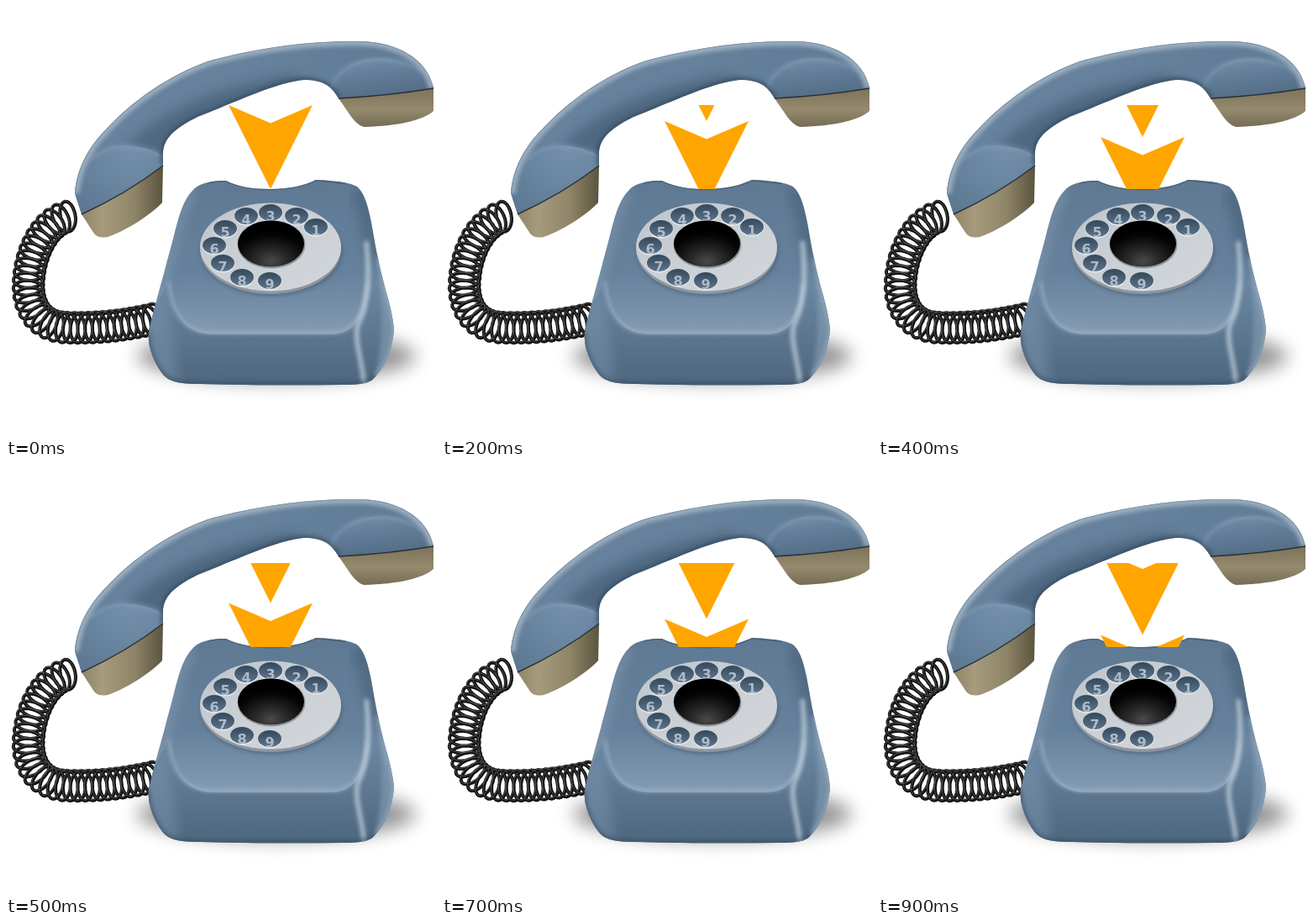
An HTML page for the animation above (1 s loop, 512x512 px).

```html
<!DOCTYPE html>
<html lang="en">
<head>
<meta charset="utf-8">
<title>Telephone</title>
<style>
html, body { margin: 0; width: 100%; height: 100%; overflow: hidden; background: #fff; }
svg { display: block; width: 100vw; height: 100vh; }
text { font: bold 16px "DejaVu Sans", sans-serif; text-anchor: middle; fill: #aebbc7; }
</style>
</head>
<body>
<svg viewBox="0 0 512 512">
  <defs>
    <linearGradient id="bar" gradientUnits="userSpaceOnUse" x1="90" y1="0" x2="509" y2="0">
      <stop offset="0" stop-color="#67829d"/><stop offset=".5" stop-color="#66819c"/>
      <stop offset="1" stop-color="#5f7a95"/>
    </linearGradient>
    <radialGradient id="capL" gradientUnits="userSpaceOnUse" cx="150" cy="168" r="100">
      <stop offset="0" stop-color="#7590ab"/><stop offset=".5" stop-color="#68849f"/>
      <stop offset="1" stop-color="#5b7690"/>
    </radialGradient>
    <linearGradient id="capR" x1="0" y1="0" x2=".3" y2="1">
      <stop offset="0" stop-color="#7891aa"/><stop offset=".45" stop-color="#627d98"/>
      <stop offset="1" stop-color="#516a83"/>
    </linearGradient>
    <linearGradient id="tanL" x1="0" y1="0" x2="1" y2="0">
      <stop offset="0" stop-color="#8f8566"/><stop offset=".25" stop-color="#a69b7d"/>
      <stop offset=".65" stop-color="#8e8467"/><stop offset="1" stop-color="#5b543f"/>
    </linearGradient>
    <linearGradient id="tanR" x1="0" y1="0" x2="0" y2="1">
      <stop offset="0" stop-color="#7d7359"/><stop offset=".55" stop-color="#958a6d"/>
      <stop offset="1" stop-color="#756c54"/>
    </linearGradient>
    <linearGradient id="body" x1="0" y1="0" x2="0" y2="1">
      <stop offset="0" stop-color="#5f7993"/><stop offset=".45" stop-color="#66819c"/>
      <stop offset=".75" stop-color="#839bb2"/><stop offset="1" stop-color="#5d7790"/>
    </linearGradient>
    <linearGradient id="front" x1="0" y1="0" x2="0" y2="1">
      <stop offset="0" stop-color="#6c88a3"/><stop offset=".4" stop-color="#5f7a94"/>
      <stop offset="1" stop-color="#4c647c"/>
    </linearGradient>
    <linearGradient id="plate" x1="0" y1="0" x2="1" y2="1">
      <stop offset="0" stop-color="#bdc4cb"/><stop offset=".5" stop-color="#cbd0d5"/>
      <stop offset="1" stop-color="#d3d7db"/>
    </linearGradient>
    <linearGradient id="hole" x1="0" y1="0" x2="0" y2="1">
      <stop offset="0" stop-color="#34485b"/><stop offset="1" stop-color="#5b738b"/>
    </linearGradient>
    <radialGradient id="knob" cx=".5" cy=".88" r=".68">
      <stop offset="0" stop-color="#4a4a4a"/><stop offset=".35" stop-color="#292929"/>
      <stop offset=".8" stop-color="#060606"/><stop offset="1" stop-color="#000"/>
    </radialGradient>
    <filter id="soft" x="-50%" y="-50%" width="200%" height="200%"><feGaussianBlur stdDeviation="2.500"/></filter>
    <filter id="glow" x="-50%" y="-50%" width="200%" height="200%"><feGaussianBlur stdDeviation="7"/></filter>
    <filter id="wide" x="-50%" y="-80%" width="200%" height="260%"><feGaussianBlur stdDeviation="11"/></filter>
    <path id="base" d="M255 208 C240 209 228 212 222 220 C206 236 202 270 192 303 C184 335 174 365 170 390 C168 405 177 425 185 436 C192 446 201 450 232 450 Q316 452 400 451 C425 451 434 449 440 441 C452 428 460 410 462 385 C460 360 450 335 443 300 C436 272 434 232 420 217 Q414 209 369 207 C355 214 337 218 315 218 C292 218 276 215 262 208 Z"/>
    <path id="hand" d="M82 223 C84 196 96 170 119 147 C150 113 195 82 240 66 C300 49 365 41 423 42 C464 43 502 62 509 98 Q455 107 396 110 C388 96 379 88 354 88 C318 92 270 116 228 132 C202 145 187 157 187 176 V190 Q143 224 90 248 Z"/>
    <path id="rim" d="M82 223 C84 196 96 170 119 147 C150 113 195 82 240 66 C300 49 365 41 423 42 C464 43 502 62 509 98" fill="none"/>
    <path id="under" d="M187 190 V176 C187 157 202 145 228 132 C270 116 318 92 354 88 C379 88 388 96 396 110" fill="none"/>
    <clipPath id="baseClip"><use href="#base"/></clipPath>
    <clipPath id="handClip"><use href="#hand"/></clipPath>
    <clipPath id="holeClip"></clipPath>
    <clipPath id="slot"><rect x="265" y="118" width="100" height="100"/></clipPath>
    <path id="dart" d="M265 118 L315 139.500 L365 118 L315 218 Z"/>
  </defs>

  <ellipse cx="322" cy="417" rx="166" ry="30" fill="#000" opacity=".42" filter="url(#wide)"/>

  <g id="cord" fill="none" stroke-linejoin="round"></g>

  <use href="#base" fill="url(#body)"/>
  <g clip-path="url(#baseClip)">
    <path d="M222 220 C206 236 202 270 192 303 L178 350" fill="none" stroke="#8fa6bb" stroke-width="14" opacity=".45" filter="url(#glow)"/>
    <path d="M420 217 C434 232 436 272 443 300" fill="none" stroke="#3f566d" stroke-width="26" opacity=".45" filter="url(#glow)"/>
    <path d="M194 328 C196 364 211 390 246 391 H388 C416 390 430 367 431 325 L475 360 V460 H160 V390 Z" fill="url(#front)"/>
    <path d="M194 328 C196 364 211 389 246 389 H388 C414 389 428 368 430 330" fill="none" stroke="#a9bdcf" stroke-width="3" opacity=".8" filter="url(#soft)"/>
    <path d="M190 335 C188 365 205 400 205 452 H160 V390 Z" fill="#7f98b0" opacity=".45" filter="url(#glow)"/>
    <path d="M429 280 C434 325 431 357 419 380 C414 398 424 420 427 455" fill="none" stroke="#cbdae7" stroke-width="5" opacity=".8" filter="url(#soft)"/>
    <path d="M441 315 C450 350 450 400 437 452 L468 440 L470 375 Z" fill="#8da4b9" opacity=".5" filter="url(#soft)"/>
    <path d="M443 300 C450 335 460 360 462 385 C460 410 452 428 440 441" fill="none" stroke="#a9bccd" stroke-width="4" opacity=".6" filter="url(#soft)"/>
    <path d="M170 390 C168 405 177 425 185 436 C192 446 201 450 232 450 H400 Q431 451 440 441" fill="none" stroke="#34485c" stroke-width="4" opacity=".7" filter="url(#soft)"/>
    <path d="M240 210 L255 208 L262 208 C276 215 292 218 315 218 C337 218 355 214 369 207 L405 211" fill="none" stroke="#465c71" stroke-width="3" opacity=".7"/>
  </g>

  <ellipse cx="316" cy="292" rx="84" ry="53" fill="#354a5f" opacity=".5" filter="url(#soft)"/>
  <ellipse cx="315" cy="290" rx="84" ry="53" fill="#8d959e"/>
  <ellipse cx="315" cy="287" rx="84" ry="52.500" fill="url(#plate)"/>
  <g id="holes"></g>
  <g id="digits" clip-path="url(#holeClip)"></g>
  <ellipse cx="316" cy="284" rx="40.500" ry="28.500" fill="#777e85" opacity=".7"/>
  <ellipse cx="315.500" cy="283" rx="39.500" ry="27.500" fill="url(#knob)"/>

  <path d="M90 248 Q143 224 187 190 L186 234 C172 249 144 267 121 275 Q110 277 105 271 Z" fill="url(#tanL)"/>
  <path d="M396 110 Q455 107 509 98 V125 C497 136 467 143 426 144 C414 140 409 128 396 110 Z" fill="url(#tanR)"/>
  <use href="#hand" fill="url(#bar)"/>
  <g clip-path="url(#handClip)">
    <path d="M145 165 C180 128 250 95 340 82 L396 110 L350 96 L228 140 L187 180 Z" fill="#40586f" opacity=".6" filter="url(#glow)"/>
    <path d="M70 230 C83 190 105 169 138 166 Q165 165 190 180 V195 L85 255 Z" fill="url(#capL)"/>
    <path d="M100 184 Q115 168 138 167 Q164 166 186 178" fill="none" stroke="#94aec6" stroke-width="3" opacity=".5" filter="url(#soft)"/>
    <path d="M386 112 C386 82 409 62 446 62 C478 63 497 76 512 99 L396 116 Z" fill="url(#capR)"/>
    <path d="M387 105 C388 80 411 63 446 63 Q476 64 494 77" fill="none" stroke="#95afc8" stroke-width="3" opacity=".5" filter="url(#soft)"/>
    <use href="#rim" stroke="#a9bac9" stroke-width="11" opacity=".8" filter="url(#soft)"/>
    <use href="#rim" stroke="#70869b" stroke-width="2" opacity=".7"/>
    <use href="#under" stroke="#2c4155" stroke-width="5" opacity=".7" filter="url(#soft)"/>
  </g>
  <path d="M90 248 Q143 224 187 190 M396 110 Q455 107 509 98" fill="none" stroke="#2b3034" stroke-width="1.500"/>

  <g clip-path="url(#slot)" fill="#ffa500">
    <g id="darts"><use href="#dart"/><use href="#dart" y="-100"/></g>
  </g>
</svg>
<script>
const byId = id => document.getElementById(id);
function add(parent, tag, attrs, text = "") {
  const node = document.createElementNS("http://www.w3.org/2000/svg", tag);
  for (const key in attrs) node.setAttribute(key, attrs[key]);
  node.textContent = text;
  return parent.appendChild(node);
}

// Finger holes, numbered anticlockwise from the right
const holes = [[369, 263], [346, 250], [315, 246], [286, 250], [261, 265],
               [248, 285], [258, 306], [281, 323], [314, 327]];
holes.forEach(([cx, cy], i) => {
  add(byId("holes"), "ellipse", { cx, cy: cy + 1, rx: 14.5, ry: 10.5, fill: "#e4e8eb" });
  add(byId("holes"), "ellipse", { cx, cy, rx: 14, ry: 10, fill: "url(#hole)" });
  add(byId("holeClip"), "ellipse", { cx, cy, rx: 14, ry: 10 });
  add(byId("digits"), "text", { x: cx, y: cy + 10 }, i + 1);
});

// Coiled cord: loops swept along a smooth centre line
const cord = byId("cord");
const line = add(cord, "path", { d: "M76 250 C50 254 30 287 27 325 C24 356 38 383 74 383 C108 384 140 381 178 372" });
const length = line.getTotalLength(), turns = 33, steps = turns * 24;
let coil = "";
for (let i = 0; i <= steps; i++) {
  const s = length * i / steps, angle = i / 24 * 2 * Math.PI;
  const p = line.getPointAtLength(s);
  const a = line.getPointAtLength(Math.max(0, s - 1));
  const b = line.getPointAtLength(Math.min(length, s + 1));
  const d = Math.hypot(b.x - a.x, b.y - a.y);
  const tx = (b.x - a.x) / d, ty = (b.y - a.y) / d;
  const u = 11 * Math.cos(angle), v = 18 * Math.sin(angle);
  coil += (i ? "L" : "M") + (p.x + tx * u - ty * v).toFixed(1) + " " + (p.y + ty * u + tx * v).toFixed(1);
}
line.remove();
add(cord, "path", { d: coil, stroke: "#111", "stroke-width": 4 });
add(cord, "path", { d: coil, stroke: "#666", "stroke-width": 0.7, transform: "translate(-.6 -.8)" });

const darts = byId("darts");
function draw(now) {
  const step = Math.floor(now % 1000 / 100);
  darts.setAttribute("transform", `translate(0 ${step * 9.5})`);
  requestAnimationFrame(draw);
}
draw(0);
</script>
</body>
</html>
```
